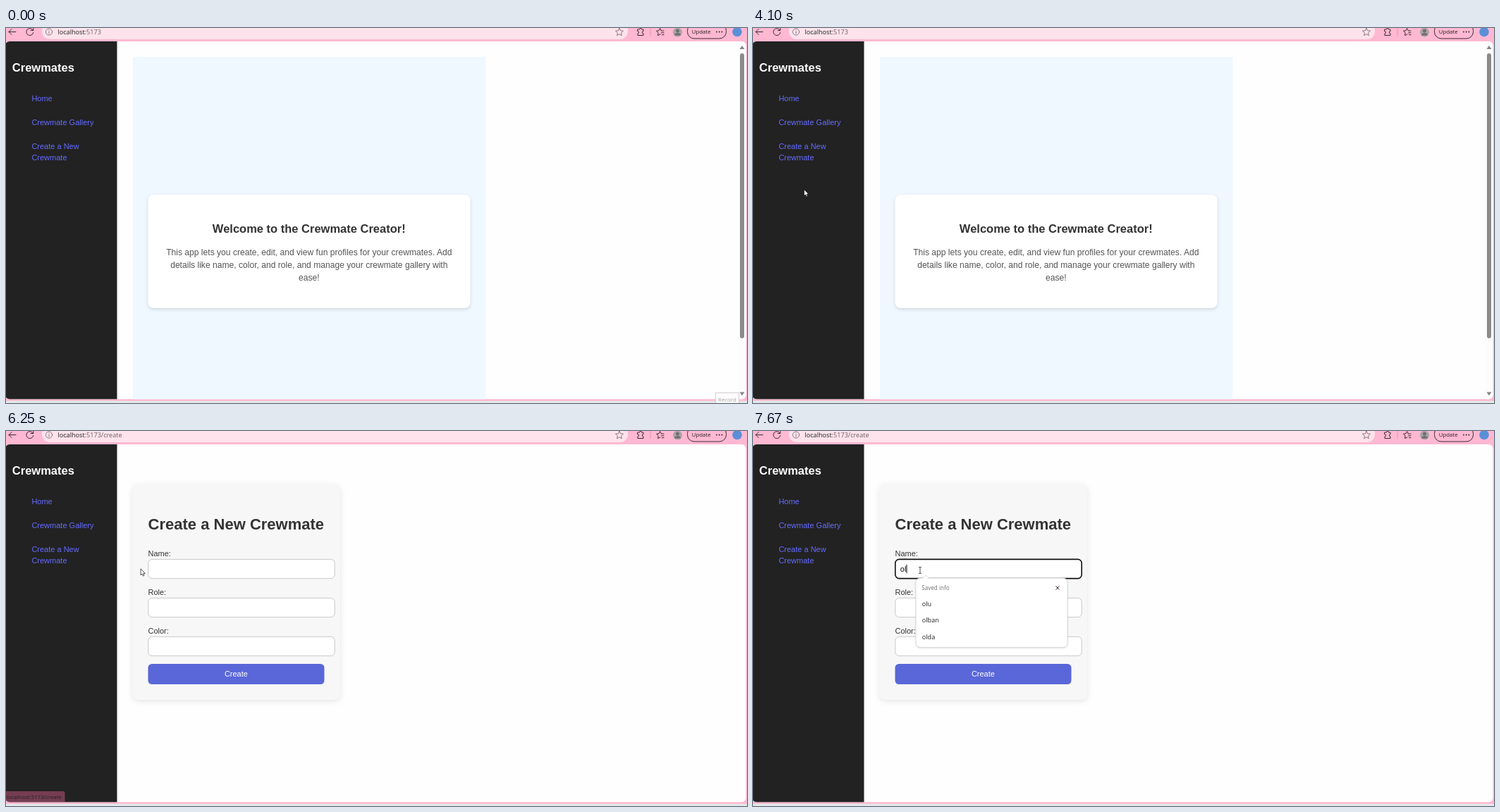
Write an HTML page that moves like this. It is 1051 px wide and 533 px high and loops after 8000 ms.

```html
<!DOCTYPE html>
<html lang="en">
<head>
<meta charset="utf-8">
<title>Crewmates</title>
<style>
  html, body { margin: 0; width: 100%; height: 100%; overflow: hidden; background: #ffb8d1; }
  svg { display: block; }
  text { font: 11px "Liberation Sans", Arial, sans-serif; fill: #333; white-space: pre; }
  .ui { font-family: "Open Sans", "Noto Sans", sans-serif; font-size: 9.1px; fill: #222; }
  .small { font-size: 7.9px; }
  .head { font-weight: bold; font-size: 16.5px; }
  .mid { text-anchor: middle; }
  .intro text { font-size: 12.1px; fill: #555; }
  .nav text { fill: #646cff; }
  .nav .hover { fill: #747bff; }
  .icon { fill: none; stroke: #3a2a31; stroke-width: 1; stroke-linecap: round; stroke-linejoin: round; }
  .field { fill: #fff; stroke: #bbb; stroke-width: .8; }
  .field.focus { stroke: #101010; stroke-width: 1.6; }
</style>
</head>
<body>
<svg width="1051" height="533" viewBox="0 0 1051 533">
  <defs>
    <clipPath id="page"><rect x="-1" y="19" width="1050.5" height="508.5" rx="6"/></clipPath>
  </defs>
  <rect width="1051" height="533" fill="#ffb8d1"/>
  <rect y="530" width="1051" height="3" fill="#e3e8e9"/>

  <!-- browser bar -->
  <rect x="51" y="-8" width="831" height="24" rx="11" fill="#fee3ec"/>
  <g class="icon">
    <path d="M14 5.5H4M8 1.5L4 5.5L8 9.5"/>
    <path d="M38.3 3.2A5 5 0 1 0 38.8 6.5M38.8 0V3.5H35.2"/>
    <g stroke="#6d5c63" stroke-width=".8">
      <circle cx="61" cy="5.5" r="4.6"/>
      <path d="M61 5V8M61 3V3.2"/>
      <path d="M870 0L871.6 3.7L875.5 4.1L872.6 6.8L873.4 10.7L870 8.7L866.6 10.7L867.4 6.8L864.5 4.1L868.4 3.7Z"/>
    </g>
    <path d="M896 2H898.5A1.6 1.6 0 0 1 901.7 2H904V4.6A1.6 1.6 0 0 0 904 7.8V10.5H896V7.8A1.6 1.6 0 0 0 896 4.6Z"/>
    <path d="M914 0V11" stroke="#d994ae" stroke-width=".8"/>
    <path d="M928 9L924.5 10.5L925.2 6.8L922.5 4.2L926 3.7L927.6 .5L929.2 3.5M929.5 4H933M929.5 6.8H933M930.5 9.6H933"/>
    <rect x="966.5" y="-6" width="55" height="21" rx="9.5"/>
  </g>
  <circle cx="952.5" cy="6" r="6.5" fill="#a9a3a6"/>
  <circle cx="952.5" cy="4" r="2.5" fill="#736d70"/>
  <path d="M948 10.5A4.5 3.5 0 0 1 957 10.5Z" fill="#736d70"/>
  <text class="ui small" x="972.7" y="8.3">Update</text>
  <g fill="#222"><circle cx="1008" cy="5.5" r=".9"/><circle cx="1011.7" cy="5.5" r=".9"/><circle cx="1015.4" cy="5.5" r=".9"/></g>
  <circle cx="1037" cy="5.5" r="6.8" fill="#5a8fd8"/>
  <text class="ui" x="73.5" y="9">localhost<tspan fill="#6b5c63">:5173<tspan id="path"></tspan></tspan></text>

  <g clip-path="url(#page)">
    <rect y="19" width="1051" height="509" fill="#fefefe"/>
    <rect y="19" width="157.5" height="509" fill="#222"/>
    <text class="head" x="8.8" y="62.3" style="fill:#fff">Crewmates</text>
    <g class="nav">
      <text x="36.4" y="103.6">Home</text>
      <text x="36.4" y="137.7">Crewmate Gallery</text>
      <g id="link"><text x="36.4" y="171.8">Create a New</text><text x="36.4" y="188.3">Crewmate</text></g>
    </g>

    <g id="home">
      <rect x="180" y="41" width="500.5" height="487" fill="#f0f8ff"/>
      <rect x="201.5" y="237" width="457" height="161" rx="8" fill="#fff" style="filter:drop-shadow(0 2px 2.5px rgba(0,0,0,.13))"/>
      <text class="head mid" x="429.8" y="290.7">Welcome to the Crewmate Creator!</text>
      <g class="intro mid">
        <text x="429.8" y="322.8">This app lets you create, edit, and view fun profiles for your crewmates. Add</text>
        <text x="429.8" y="341">details like name, color, and role, and manage your crewmate gallery with</text>
        <text x="429.8" y="359">ease!</text>
      </g>
      <rect x="1038" y="19" width="12" height="509" fill="#fcfcfc"/>
      <rect x="1041" y="36" width="6" height="405" rx="3" fill="#8b8b8b"/>
      <path d="M1040.5 30L1044 25L1047.5 30ZM1040.5 517.5L1044 522.5L1047.5 517.5Z" fill="#858585"/>
    </g>

    <g id="create">
      <rect x="179.5" y="76" width="294.5" height="306" rx="8.3" fill="#f7f7f7" style="filter:drop-shadow(0 2.5px 4px rgba(0,0,0,.1))"/>
      <text class="head" x="201.6" y="140.3" style="font-size:22px">Create a New Crewmate</text>
      <text x="201.5" y="178">Name:</text>
      <text x="201.5" y="233">Role:</text>
      <text x="201.5" y="288">Color:</text>
      <rect class="field" id="name" x="201.8" y="182.4" width="264.4" height="27.2" rx="5.5"/>
      <rect class="field" x="201.8" y="237.4" width="264.4" height="27.2" rx="5.5"/>
      <rect class="field" x="201.8" y="292.4" width="264.4" height="27.2" rx="5.5"/>
      <rect x="201.5" y="331" width="250" height="29" rx="5.5" fill="#5a67d8"/>
      <text class="mid" x="326.4" y="349.2" style="fill:#fff">Create</text>
      <text id="typed" x="208.8" y="199.5" style="fill:#111"></text>
      <rect id="caret" y="190" width="1" height="12" fill="#111"/>
      <g id="popup">
        <rect id="panel" x="231" y="209" width="215" rx="6" fill="#fff" stroke="#d2d2d2" stroke-width=".8" style="filter:drop-shadow(0 1px 1px rgba(0,0,0,.12))"/>
        <path d="M240 209.6L245 204.8L250 209.6" fill="#fff" stroke="#d2d2d2" stroke-width=".8"/>
        <text class="ui" x="239.3" y="226.3" style="font-size:8.1px;fill:#707070">Saved info</text>
        <path class="icon" d="M429.7 220.7L434.3 225.3M434.3 220.7L429.7 225.3"/>
        <text class="ui" x="239.8" y="249">olu</text>
        <text class="ui" x="239.8" y="272.4">olban</text>
        <text class="ui" x="239.8" y="296">olda</text>
      </g>
    </g>

    <g id="status">
      <path d="M0 512H80.5A3 3 0 0 1 83.5 515V528H0Z" fill="#ff6ba3"/>
      <text class="ui" x=".8" y="522.5" style="font-size:7.8px">localhost:5173/create</text>
    </g>
  </g>

  <g id="record">
    <rect x="1006.5" y="518.5" width="33" height="20" fill="#fdfbfc" stroke="#d3cdd0"/>
    <text class="ui small" x="1010" y="531.3" style="fill:#a5a5a5">Record</text>
  </g>
  <g id="stop">
    <rect x="1014" y="520" width="25" height="20" fill="#fcfcfc" stroke="#b5b0b2" stroke-width=".9"/>
    <text class="ui" x="1018" y="532.3" style="font-size:8px;fill:#555">Stop</text>
  </g>

  <g id="cursor" stroke-linejoin="round">
    <path id="arrow" d="M0 0V9L2 7.3L3.4 10.3L4.9 9.6L3.6 6.7H6.3Z" fill="#fff" stroke="#111" stroke-width=".7"/>
    <path id="hand" d="M-1 .5Q0-.8 1 .5V4L4.6 5Q5.4 5.4 5.2 7L4.3 12H-1.2L-3.8 7.7Q-3.6 6.3-2.3 7L-1 8Z" fill="#fff" stroke="#111" stroke-width=".7"/>
    <path id="beam" d="M-2-4.5H-.6L0-4L.6-4.5H2M0-4V4M-2 4.5H-.6L0 4L.6 4.5H2" fill="none" stroke="#222" stroke-width=".8"/>
  </g>
</svg>
<script>
  const LOOP = 8000;
  const el = Object.fromEntries([...document.querySelectorAll("[id]")].map(e => [e.id, e]));
  const clamp = v => Math.max(0, Math.min(1, v));
  const ramp = (t, a, b) => clamp((t - a) / (b - a));
  const fade = (e, a) => e.style.opacity = a;
  const show = (e, on) => e.style.display = on ? "" : "none";

  // start, end, steps, then the control and end point of each pointer stroke
  const start = [1147, 615];
  const strokes = [
    [2410, 2610, 4, [875.5, 434.5], [604, 254]],
    [3010, 3220, 4, [491.5, 222.5], [379.5, 191.5]],
    [3750, 4100, 6, [200, 290], [72.5, 229.5]],
    [4360, 4830, 8, [66, 200], [54, 181]],
    [5920, 6390, 8, [145, 195], [237, 198]],
  ];

  function pointer(t) {
    let p = start;
    for (const [a, b, n, c, end] of strokes) {
      if (t < a) break;
      const step = Math.min(n, 1 + Math.floor((t - a + 5) / (b - a) * (n - 1)));
      const k = step / n, j = 1 - k;
      p = p.map((v, i) => j * j * v + 2 * j * k * c[i] + k * k * end[i]);
    }
    return p;
  }

  function draw(t) {
    const [x, y] = pointer(t);
    const created = t >= 5250, focused = t >= 6530;
    const overLink = x > 30 && x < 104 && y > 160 && y < 193;
    const overField = created && x > 201 && x < 466 && y > 182 && y < 210;

    show(el.home, !created);
    show(el.create, created);
    el.path.textContent = created ? "/create" : "";
    for (const line of el.link.children) line.classList.toggle("hover", overLink);
    fade(el.status, ramp(t, 4940, 5160) * (1 - ramp(t, 6120, 6330)));

    show(el.record, t < 70);
    fade(el.stop, t < 2540 ? ramp(t, 1100, 1290) : 0);

    el.name.classList.toggle("focus", focused);
    const typed = t < 7460 ? "" : t < 7670 ? "o" : "ol";
    el.typed.textContent = typed;
    el.caret.setAttribute("x", 209 + [0, 6.1, 8.5][typed.length]);
    show(el.caret, focused && (t < 7060 || t >= 7460));
    show(el.popup, t >= 7530);
    el.panel.setAttribute("height", t < 7670 ? 181 : 98.5);

    show(el.cursor, t >= 2410);
    el.cursor.setAttribute("transform", `translate(${x} ${y})`);
    show(el.hand, overLink);
    show(el.beam, overField);
    show(el.arrow, !overLink && !overField);
  }

  function tick() {
    draw(performance.now() % LOOP);
    requestAnimationFrame(tick);
  }
  tick();
</script>
</body>
</html>
```
